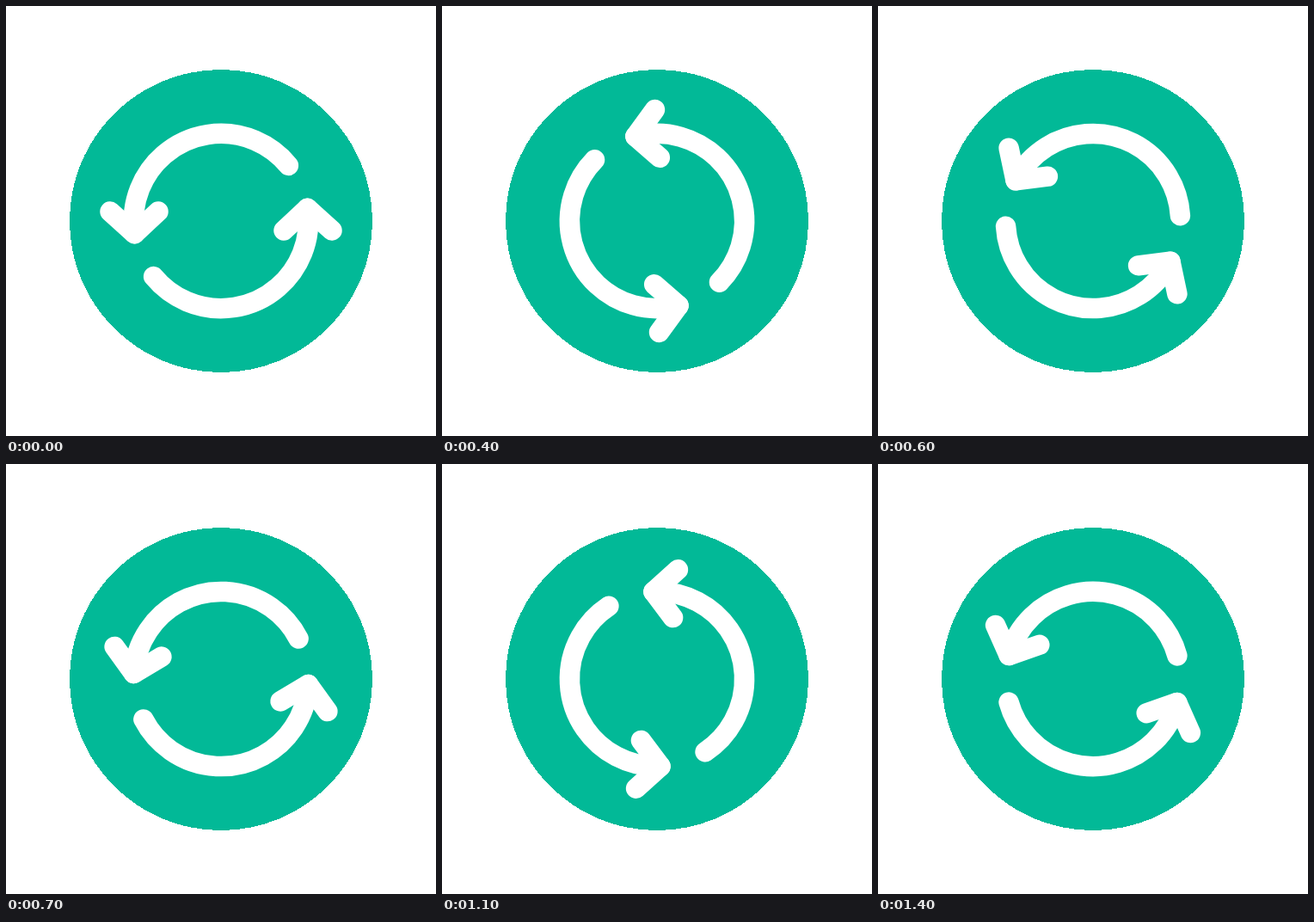
Recreate the animation shown at these times as an HTML page. Size 500 px wide and 500 px high, loop 1.5 s.

```html
<!DOCTYPE html>
<html lang="en">
<head>
<meta charset="utf-8">
<title>Refresh</title>
<style>
  html, body { margin: 0; width: 100%; height: 100%; overflow: hidden; background: #fff; }
  svg { display: block; width: 100%; height: 100%; }
</style>
</head>
<body>
<svg viewBox="0 0 500 500">
  <defs>
    <g id="arrow">
      <path id="arc"/>
      <path d="M-129 -11L-100.5 14.7L-73 -11"/>
    </g>
  </defs>
  <circle cx="250" cy="250" r="176" fill="#02b997" shape-rendering="crispEdges"/>
  <g id="spin" fill="none" stroke="#fff" stroke-width="23.5" stroke-linecap="round" stroke-linejoin="round">
    <use href="#arrow"/>
    <use href="#arrow" transform="rotate(180)"/>
  </g>
</svg>
<script>
  const LOOP = 1500, STEP = 100, RADIUS = 101.6;
  const spin = document.getElementById("spin");

  function point(deg) {
    const a = deg * Math.PI / 180;
    return `${RADIUS * Math.cos(a)} ${RADIUS * Math.sin(a)}`;
  }

  document.getElementById("arc").setAttribute("d",
    `M${point(-39.5)}A${RADIUS} ${RADIUS} 0 0 0 ${point(171.7 - 360 + 30)}` +
    `A${RADIUS} ${RADIUS} 0 0 0 ${point(171.7)}`);

  // One full counterclockwise turn per loop, in discrete steps.
  function draw(ms) {
    const step = Math.floor((ms % LOOP) / STEP);
    const angle = -360 * step * STEP / LOOP;
    spin.setAttribute("transform", `translate(250 250) rotate(${angle})`);
  }

  const start = performance.now();
  function tick() {
    draw(performance.now() - start);
    requestAnimationFrame(tick);
  }
  draw(0);
  requestAnimationFrame(tick);
</script>
</body>
</html>
```
